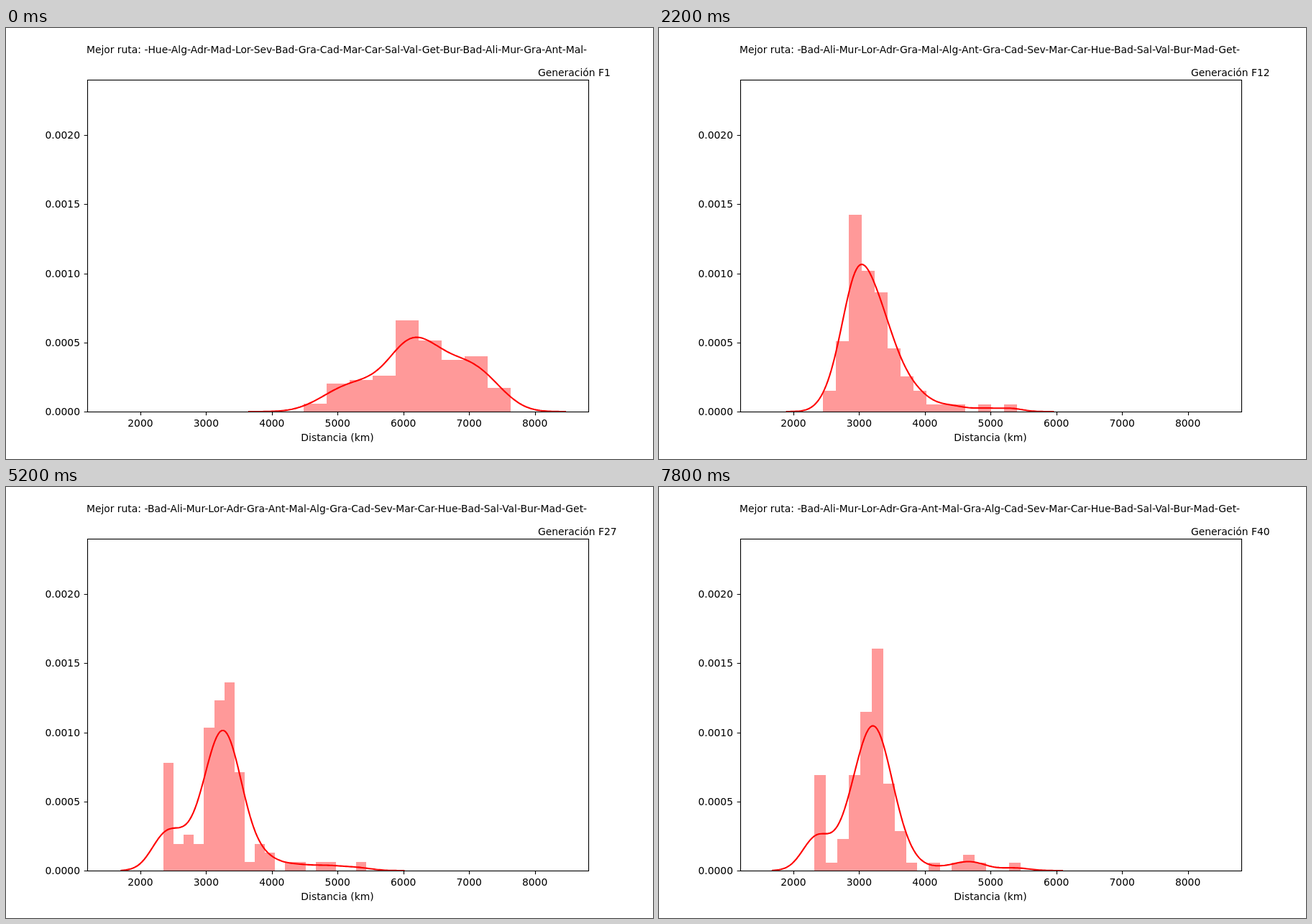
Write an HTML page that moves like this. It is 900 px wide and 600 px high and loops after 8 s.

```html
<!DOCTYPE html>
<html lang="es">
<head>
<meta charset="utf-8">
<title>Distancia por generación</title>
<style>
  html, body { margin: 0; width: 100%; height: 100%; overflow: hidden; background: #fff; }
  svg { display: block; font: 13.89px "DejaVu Sans", sans-serif; }
  .axes { fill: none; stroke: #000; stroke-width: 1.11; }
  .middle { text-anchor: middle; }
  .end { text-anchor: end; }
</style>
</head>
<body>
<svg width="900" height="600" viewBox="0 0 900 600">
  <clipPath id="plot"><rect x="113" y="72" width="697" height="462"/></clipPath>
  <path id="bars" fill="#f99"/>
  <path id="curve" fill="none" stroke="#f00" stroke-width="2.083" stroke-linejoin="round" clip-path="url(#plot)"/>
  <rect class="axes" x="113.5" y="72.5" width="697" height="462"/>
  <path id="ticks" class="axes"/>
  <g id="labels"></g>
  <text id="title" class="middle" x="460" y="35"></text>
  <text class="middle" x="461" y="575">Distancia (km)</text>
  <text id="generation" x="740" y="67"></text>
</svg>
<script>
const STEP = 200, GENERATIONS = 40, BASE = 534;
const AREA = 17604; // square pixels under a density of total mass 1
const byId = id => document.getElementById(id);
const lerp = (a, b, p) => a + (b - a) * p;

// lo: first bin edge, w: bin width, h: kernel bandwidth (all px),
// lean: mean position of the samples inside the first bin
const populations = [
  { gen: 1, lo: 414, w: 32, h: 25.67, lean: .5, counts: [2, 7, 8, 9, 23, 18, 13, 14, 6] },
  { gen: 7, lo: 327, w: 20.15, h: 18, lean: .5, counts: [5, 10, 25, 16, 19, 9, 7, 5, 1, 0, 2, 0, 1] },
  { gen: 12, lo: 228, w: 18, h: 17.1, lean: .5, counts: [3, 10, 28, 20, 17, 9, 5, 3, 1, 1, 1, 0, 1, 0, 1] },
  { gen: 17, lo: 219, w: 19.46, h: 20.8, lean: .5, counts: [15, 2, 5, 15, 22, 26, 5, 2, 1, 3, 1, 1, 2] },
  { gen: 23, lo: 219, w: 16.33, h: 19.7, lean: .1, counts: [19, 1, 2, 17, 18, 28, 5, 3, 1, 2, 1, 0, 0, 1, 2] },
  { gen: 30, lo: 219, w: 12.46, h: 20, lean: .15,
    counts: [12, 0, 0, 4, 5, 15, 22, 17, 13, 2, 0, 4, 1, 0, 0, 1, 1, 1, 0, 1, 0, 0, 0, 1] },
  { gen: 40, lo: 216, w: 15.94, h: 19.7, lean: .15,
    counts: [12, 1, 4, 12, 20, 28, 11, 5, 1, 0, 1, 0, 1, 2, 1, 0, 0, 1] }
];
for (const p of populations) {
  p.hi = p.lo + p.w * p.counts.length;
  p.samples = p.counts.flatMap((count, bin) => Array.from({ length: count }, (_, i) =>
    p.lo + p.w * (bin + (i + .5) / count * (bin ? 1 : 2 * p.lean))));
}

const routes = [
  [1, "Hue-Alg-Adr-Mad-Lor-Sev-Bad-Gra-Cad-Mar-Car-Sal-Val-Get-Bur-Bad-Ali-Mur-Gra-Ant-Mal"],
  [4, "Ali-Mur-Lor-Ant-Adr-Gra-Mal-Sev-Bad-Gra-Cad-Mar-Car-Hue-Alg-Mad-Sal-Val-Get-Bur-Bad"],
  [10, "Bad-Ali-Mur-Lor-Adr-Gra-Mal-Alg-Ant-Gra-Cad-Sev-Mar-Car-Hue-Bad-Sal-Val-Bur-Mad-Get"],
  [15, "Bad-Ali-Mur-Lor-Adr-Gra-Ant-Mal-Alg-Gra-Cad-Sev-Mar-Car-Hue-Bad-Sal-Val-Bur-Mad-Get"],
  [34, "Bad-Ali-Mur-Lor-Adr-Gra-Ant-Mal-Gra-Alg-Cad-Sev-Mar-Car-Hue-Bad-Sal-Val-Bur-Mad-Get"]
];

// Sorted samples move from one known population to the next.
function populationAt(gen) {
  const next = Math.max(1, populations.findIndex(p => p.gen >= gen));
  const a = populations[next - 1], b = populations[next];
  const p = (gen - a.gen) / (b.gen - a.gen);
  const mix = key => lerp(a[key], b[key], p);
  return {
    lo: mix("lo"), hi: mix("hi"), w: mix("w"), h: mix("h"),
    samples: a.samples.map((x, i) => lerp(x, b.samples[i], p))
  };
}

function barsPath({ lo, w, samples }) {
  const counts = [];
  for (const x of samples) {
    const bin = Math.max(0, Math.floor((x - lo) / w));
    counts[bin] = (counts[bin] || 0) + 1;
  }
  let d = "";
  counts.forEach((count, bin) => {
    const left = Math.round(lo + bin * w), right = Math.round(lo + (bin + 1) * w);
    const top = Math.round(BASE - count * AREA / samples.length / w);
    d += `M${left} ${BASE}V${top}H${right}V${BASE}Z`;
  });
  return d;
}

function curvePath({ lo, hi, w, h, samples }) {
  const s = Math.sqrt(h * h - w * w / 12); // samples already spread across their bins
  const scale = AREA / samples.length / (s * Math.sqrt(2 * Math.PI));
  const start = lo - 3 * h, end = hi + 3 * h, n = 160;
  return "M" + Array.from({ length: n + 1 }, (_, i) => {
    const x = lerp(start, end, i / n);
    const sum = samples.reduce((total, v) => total + Math.exp(-(((x - v) / s) ** 2) / 2), 0);
    return `${x.toFixed(2)} ${(BASE - sum * scale).toFixed(2)}`;
  }).join("L");
}

function drawAxes() {
  let ticks = "", labels = "";
  for (let i = 0; i < 7; i++) {
    const x = 186.9 + 91.45 * i;
    ticks += `M${Math.round(x) + .5} 534.5v4.86`;
    labels += `<text class="middle" x="${x}" y="555">${2000 + 1000 * i}</text>`;
  }
  for (let i = 0; i < 5; i++) {
    const y = Math.round(BASE - 96.25 * i);
    ticks += `M113.5 ${y + .5}h-4.86`;
    labels += `<text class="end" x="103" y="${y + 5}">${(i * .0005).toFixed(4)}</text>`;
  }
  byId("ticks").setAttribute("d", ticks);
  byId("labels").innerHTML = labels;
}

let shown = 0;
function frame() {
  const gen = 1 + Math.floor(performance.now() / STEP) % GENERATIONS;
  if (gen !== shown) {
    shown = gen;
    const population = populationAt(gen);
    byId("bars").setAttribute("d", barsPath(population));
    byId("curve").setAttribute("d", curvePath(population));
    byId("title").textContent = `Mejor ruta: -${routes.findLast(([from]) => from <= gen)[1]}-`;
    byId("generation").textContent = `Generación F${gen}`;
  }
  requestAnimationFrame(frame);
}

drawAxes();
frame();
</script>
</body>
</html>
```
